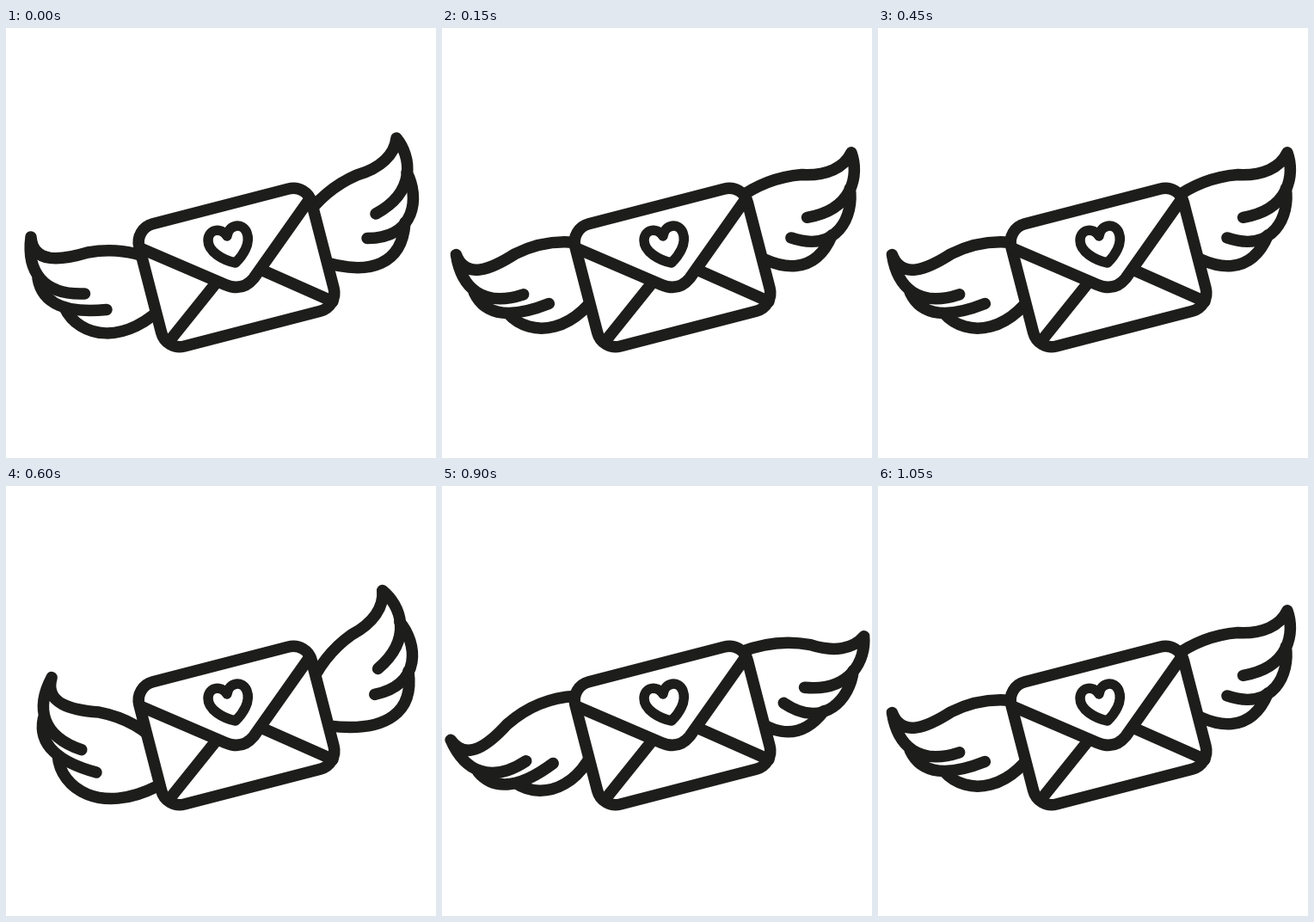
These frames come from a looping animation (500x500 px, 1.2 s). An HTML page:

```html
<!DOCTYPE html>
<html lang="en">
<head>
<meta charset="utf-8">
<title>Flying letter</title>
<style>
  html, body { margin: 0; width: 100%; height: 100%; overflow: hidden; background: #fff; }
  svg { display: block; width: 100%; height: 100%; }
  .ink { fill: none; stroke: #1d1d1b; stroke-width: 13.5; stroke-linecap: round; stroke-linejoin: round; }
</style>
</head>
<body>
<svg viewBox="0 0 500 500">
  <g class="ink">
    <g id="left">
      <path d="M180 274C150 258 120 256.5 95 261C65 270 31 275 29 243C24 282 42 311 91.5 309"/>
      <path d="M37 291C42 322 72 332 117 327.5"/>
      <path d="M68 325C85 361 140 371 188 318"/>
    </g>
    <g id="right">
      <path d="M345 224C362 199 385 181 408 171C436 163 452 147 454 128C471 149 478 190 430 216"/>
      <path d="M466 168C481 196 477 244.5 420 244.5"/>
      <path d="M464 226C461 272 427 292 360 269"/>
    </g>
    <g>
      <rect x="-103.5" y="-73.5" width="207" height="147" rx="22" fill="#fff"
            transform="translate(268 278.5) rotate(-14.5)"/>
      <path d="M156 256L255 298.5Q275 307 288 291L353 199"/>
      <path d="M190 364L243 298M301 283L380 318"/>
      <path stroke-width="11.5" d="M267 273C252 270 235 260 235 247C235 234 250 231 257 242C259 228 275 226 280 238C285 251 275 265 267 273Z"/>
    </g>
  </g>
</svg>
<script>
  const STEP = 150;
  const order = ['level', 'low', 'lowest', 'low', 'high', 'low', 'lowest', 'low'];

  // Each pose: rotation in degrees, shift x, shift y
  const wings = [
    { id: 'left', pivot: [96, 298],
      poses: { high: [21, 0, 0], level: [0, 0, 0], low: [-16, 0, 0], lowest: [-31, 0, 10] } },
    { id: 'right', pivot: [414.5, 202],
      poses: { high: [-12, 0, 0], level: [0, 0, 0], low: [19, 0, 0], lowest: [34, 2, 12] } }
  ];

  function draw(time) {
    const pose = order[Math.floor(time / STEP) % order.length];
    for (const { id, pivot, poses } of wings) {
      const [angle, dx, dy] = poses[pose];
      document.getElementById(id).setAttribute('transform',
        `translate(${dx} ${dy}) rotate(${angle} ${pivot})`);
    }
  }

  const start = performance.now();
  function tick() {
    draw(performance.now() - start);
    requestAnimationFrame(tick);
  }
  tick();
</script>
</body>
</html>
```
